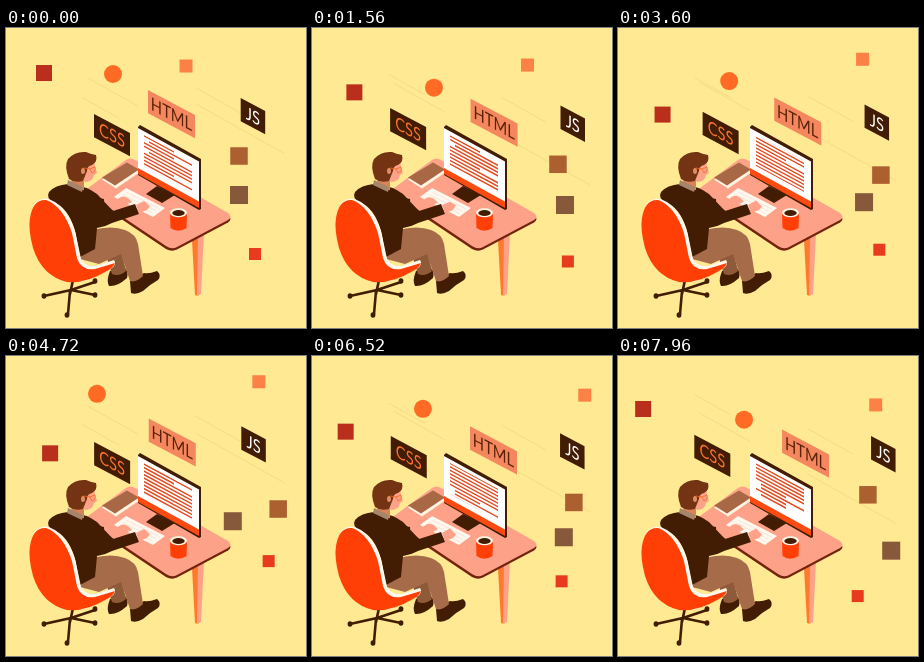
Recreate the animation shown at these times as an HTML page with a canvas. Size 300x300 px, loop 8 s.

```html
<!DOCTYPE html>
<html lang="en">
<head>
<meta charset="utf-8">
<title>Developer at a desk</title>
<style>
  html, body { margin: 0; width: 100%; height: 100%; overflow: hidden; background: #ffe992; }
  canvas { display: block; width: 100vw; height: 100vh; }
</style>
</head>
<body>
<canvas id="stage"></canvas>
<script>
const canvas = document.getElementById('stage');
const ctx = canvas.getContext('2d');
const LOOP = 8000, LEG = 2500;
const DARK = '#421c03', RED = '#ff3f06', SALMON = '#fda288', BROWN = '#a66c4a';

const mix = (a, b, k) => a + (b - a) * k;
const linear = k => k;
const sine = k => (1 - Math.cos(Math.PI * k)) / 2;
const easeOut = k => 1 - (1 - k) ** 2;

// Position on a route whose points are reached one leg apart.
function along(points, t, ease = linear, leg = LEG) {
  const i = Math.floor(t / leg);
  const k = ease(t / leg - i);
  const [a, b] = [points[i], points[i + 1]];
  return [mix(a[0], b[0], k), mix(a[1], b[1], k)];
}

function sway(a, b, t, ease) {
  return along([a, b, a, b, a], t, ease);
}

function fill(color, d) {
  ctx.fillStyle = color;
  ctx.fill(new Path2D(d));
}

function stroke(color, width, d) {
  ctx.strokeStyle = color;
  ctx.lineWidth = width;
  ctx.lineCap = ctx.lineJoin = 'round';
  ctx.stroke(new Path2D(d));
}

function ellipse(color, x, y, rx, ry = rx) {
  ctx.fillStyle = color;
  ctx.beginPath();
  ctx.ellipse(x, y, rx, ry, 0, 0, 7);
  ctx.fill();
}

function square(color, size, [x, y]) {
  ctx.fillStyle = color;
  ctx.fillRect(x - size / 2, y - size / 2, size, size);
}

function panel(label, w, back, ink, [x, y]) {
  const h = 23.3;
  ctx.save();
  ctx.transform(1, 0.53, 0, 1, x, y);
  ctx.fillStyle = back;
  ctx.fillRect(0, 0, w, h);
  ctx.fillStyle = ink;
  ctx.font = '18px Lato, sans-serif';
  ctx.textAlign = 'center';
  ctx.translate(w / 2, h / 2 + 6.3);
  ctx.scale(0.82, 1);
  ctx.fillText(label, 0, 0);
  ctx.restore();
}

function trails(t) {
  const [s] = sway([0, 0], [1, 0], t, sine);
  const trail = (x, y, len, drop) =>
    stroke('#f7dc82', 1, `M${x} ${y + drop * s}l${len} ${len * 0.56}`);
  trail(77, 70, 36, -34);
  trail(82, 50, 50, 8);
  trail(190, 60, 44, 14);
  trail(190, 76, 88, 46);
}

function floating(t) {
  trails(t);
  square('#b92f1b', 16, along([[38, 45], [45, 76], [44, 100], [27, 60], [17, 22]], t));
  ellipse('#ff6a24', ...along([[107, 46], [131, 68], [86, 34], [127, 65], [122, 58]], t), 9);
  square('#fb8146', 13, along(
    [[180, 38], [217, 37], [242, 33], [254, 25], [273, 39], [256, 50]], t, linear, 1625));
  square('#ac5f2f', 17.5, sway([233, 128], [254, 141], t < 5000 ? 0 : 0).map((v, i) =>
    v + (LEG * 2 - Math.abs(t - LEG * 2)) * [0.0083, 0.0053][i]));
  square('#88583a', 18, along([[233, 167], [265, 183], [222, 163], [271, 193], [283, 202]], t));
  square('#e83a1c', 12, along([[249, 226], [260, 238], [263, 201], [241, 241], [234, 236]], t));
  panel('HTML', 47, '#f5875f', '#592208', sway([142, 62], [166, 74.5], t, sine));
  panel('CSS', 36, DARK, '#f7742f',
    along([[88, 86], [76.5, 79], [88.3, 86], [77, 79], [75, 78]], t, easeOut));
  panel('JS', 24.5, DARK, '#fff', sway([234.7, 70], [254.7, 81], t, sine));
}

function desk() {
  fill('#ff7a2e', 'M186 212L193 208L193 267Q191 268 189 267Z');
  fill(SALMON, 'M192 208L198 205L195 266Q193 268 191 267Z');
  fill('#74240e', 'M78 166L124 133L222 187.5Q227 191 222 194.5L171 221.5Q166 224 160 221Z');
  fill(SALMON, 'M78 163L120 132Q124 129 129 132L222 185Q227 189 222 192L171 219Q166 222 160 218Z');
  fill('#fff4e2', 'M96 151.5L121 137L134 144L110 160.5Z');
  fill('#a86845', 'M96 149.5L121 134.5L133 141.5L109 157.5Z');
  fill(DARK, 'M140 166L151 158L169 167L156 175Z');
  fill('#fff8ee', 'M108 169L120 160L159 180L147 189Z');
  for (let i = 0; i < 3; i++) {
    stroke('#f3d9cc', 0.6, `M${114 + i * 3.2} ${169 - i * 2.4}l33 16.5`);
  }
}

const rand = n => {
  const v = Math.sin(n * 91.7 + 3) * 4375.5;
  return v - Math.floor(v);
};

function monitor(t) {
  fill(DARK, 'M132 99L134 97L195 131L195 181L193 182L132 147Z');
  fill('#fb4a12', 'M132 101L193 134L193 180L132 146Z');
  fill('#fff', 'M132 100L193 133.5L193 173.5L132 140Z');
  ctx.save();
  ctx.transform(1, 0.54, 0, 1, 138, 107);
  ctx.beginPath();
  ctx.rect(0, 0, 50, 31);
  ctx.clip();
  const pitch = 3.5, shift = t / 800, top = Math.floor(shift);
  ctx.fillStyle = '#e2481b';
  for (let row = top; row < top + 11; row++) {
    const indent = rand(row + 40) > 0.75 ? 5 : 0;
    const end = rand(row + 9) > 0.25 ? 48 : 30;
    ctx.fillRect(indent, (row - shift) * pitch, end - indent, 1.6);
  }
  ctx.restore();
}

function mug() {
  fill(RED, 'M164 185L181 185L180.5 200Q172 205.5 164.5 200Z');
  ellipse('#fff3e4', 172.5, 184.7, 8.5, 4.5);
  ellipse(DARK, 172.5, 185, 6.2, 3);
}

function person(t) {
  const tap = Math.sin(t / 75) * 0.8;
  // far arm and hand
  fill(SALMON, `M111 ${172 + tap}Q116 ${166 + tap} 122 ${170 + tap}L126 ${174 + tap}L117 178Z`);
  fill(DARK, 'M88 169L98 171Q99 175 94 178L86 178Z');
  // legs and shoes
  fill(DARK, 'M104 243L118 239Q123 244 121 250Q111 259 103 258Q100 253 104 243Z');
  fill(DARK, 'M124 253L138 245Q143 246 151 243Q156 247 152 252Q143 257 137 263Q130 267 125 265Z');
  fill('#8f5a3a', 'M84 207L105 205Q112 211 115 222L120 243Q113 249 106 246L99 224L86 232Z');
  fill(BROWN, 'M86 202Q106 197 119 202Q130 206 132 216L137 248Q130 255 124 253L115 226L93 236L74 231Z');
  // torso and near arm
  fill(DARK, 'M62 156Q49 157 43 164Q40 170 47 174Q62 179 69 203L74 229L89 221L91 200Q99 199 106 195L133 186L129 176L107 183L91 166Q81 158 62 156Z');
  fill(SALMON, `M130 177L138 ${173 + tap}L144 ${178 - tap}L141 182L133 185Z`);
  // head
  fill('#d98458', 'M66 148L78 151L78 162Q70 163 65 156Z');
  fill('#a7856a', 'M62 152L77 159L76 164L61 157Z');
  fill(SALMON, 'M69 132L88 133L89 139L91 145L88 147Q87 153 80 154L70 150Z');
  fill('#743312', 'M63 151Q58 138 62 131Q69 123 80 124Q84 126 90 127Q92 134 86 137Q81 138 81 143L77 153Q68 155 63 151Z');
  ellipse('#e58b63', 77, 143, 2, 3);
  stroke('#f26a1d', 0.8, 'M78 140L84 141L89 139Q90 144 86 145L84 141');
}

function chair() {
  stroke(DARK, 2.6, 'M67 252L64 266M38 268L65 262L89 254M64 263L62 286M65 262L89 267');
  for (const [x, y] of [[38, 268], [89, 253], [61, 287], [89, 267]]) ellipse(DARK, x, y, 2.4, 2.8);
  fill('#fff8ef', 'M28 177Q36 166 49 174Q67 187 71 212L75 231Q79 239 90 238L108 232Q111 236 106 240L76 254L40 230Z');
  fill(RED, 'M24 190Q27 171 40 172Q57 178 66 205L71 230Q75 243 89 241L109 235Q108 239 101 243Q79 256 61 254Q36 248 27 220Q22 201 24 190Z');
}

function draw(t) {
  const dpr = devicePixelRatio || 1;
  const w = Math.round(innerWidth * dpr), h = Math.round(innerHeight * dpr);
  if (canvas.width !== w || canvas.height !== h) {
    canvas.width = w;
    canvas.height = h;
  }
  ctx.setTransform(w / 300, 0, 0, h / 300, 0, 0);
  ctx.fillStyle = '#ffe992';
  ctx.fillRect(0, 0, 300, 300);
  floating(t);
  desk();
  monitor(t);
  mug();
  person(t);
  chair();
}

const start = performance.now();
function frame() {
  draw((performance.now() - start) % LOOP);
  requestAnimationFrame(frame);
}
frame();
</script>
</body>
</html>
```
